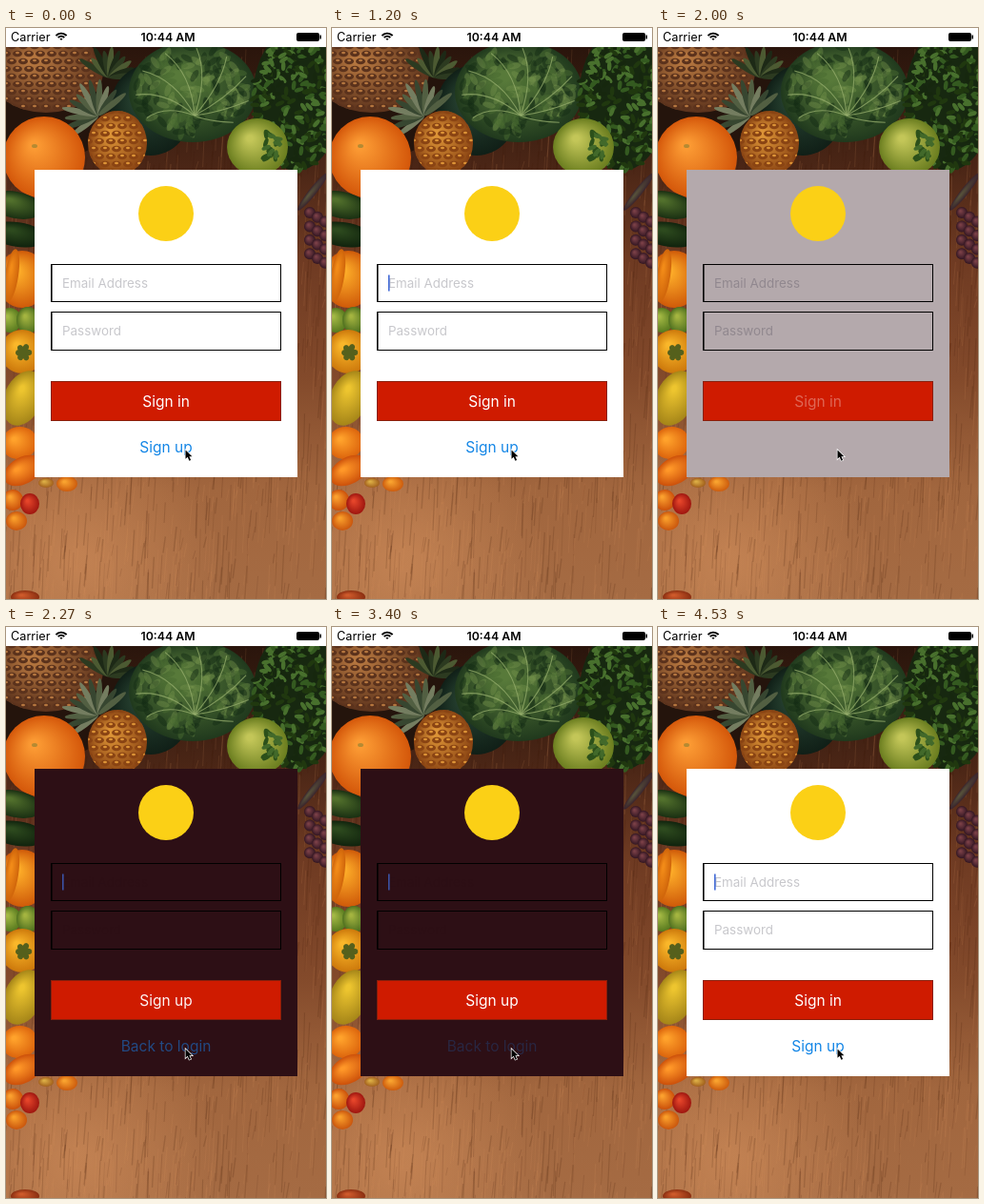
Recreate the animation shown at these times as an HTML page with a canvas. Size 336 by 600 pixels, loop 4590 ms.

```html
<!DOCTYPE html>
<html lang="en">
<head>
<meta charset="utf-8">
<title>Sign in form</title>
<style>
html, body { margin: 0; width: 100%; height: 100%; overflow: hidden; }
canvas { display: block; }
</style>
</head>
<body>
<canvas id="stage" width="336" height="600"></canvas>
<script>
const LOOP = 4590;
const stage = document.getElementById('stage');
const ctx = stage.getContext('2d');
const backdrop = paintBackdrop();

function randomizer(seed) {
  return () => (seed = seed * 16807 % 2147483647) / 2147483647;
}

function ramp(t, from, to) {
  const x = Math.min(1, Math.max(0, (t - from) / (to - from)));
  return x * x * (3 - 2 * x);
}

// Wooden table with simplified fruit and vegetables
function paintBackdrop() {
  const layer = document.createElement('canvas');
  layer.width = 336;
  layer.height = 600;
  const c = layer.getContext('2d');
  const rnd = randomizer(77);

  const blob = (x, y, rx, ry, light, dark = light, turn = 0) => {
    c.save();
    c.translate(x, y);
    c.rotate(turn);
    c.scale(rx, ry);
    const shade = c.createRadialGradient(-.25, -.3, .1, 0, 0, 1);
    shade.addColorStop(0, light);
    shade.addColorStop(1, dark);
    c.fillStyle = shade;
    c.beginPath();
    c.arc(0, 0, 1, 0, 7);
    c.fill();
    c.restore();
  };
  const leaves = (x, y, rx, ry, count, size, colors) => {
    for (let i = 0; i < count; i++) {
      const a = rnd() * 6.28, r = Math.sqrt(rnd());
      blob(x + rx * r * Math.cos(a), y + ry * r * Math.sin(a), size, size * .45,
        colors[i % colors.length], undefined, rnd() * 3.14);
    }
  };
  const spikes = (x, y, from, to, count, length, colors) => {
    for (let i = 0; i < count; i++) {
      const a = from + (to - from) * i / (count - 1), r = length * (.75 + rnd() * .3) / 2;
      blob(x + r * Math.cos(a), y + r * Math.sin(a), r, 3.2, colors[i % colors.length], undefined, a);
    }
  };
  const pineapple = (x, y, rx, ry, light, dark) => {
    blob(x, y, rx, ry, light, dark);
    c.save();
    c.beginPath();
    c.ellipse(x, y, rx, ry, 0, 0, 7);
    c.clip();
    for (let row = 0, py = y - ry; py < y + ry; py += 8, row++)
      for (let px = x - rx + row % 2 * 6; px < x + rx; px += 12) {
        blob(px, py, 5, 3.2, dark);
        blob(px, py - 1, 2, 1.3, light);
      }
    c.restore();
  };
  const wash = (gradient, ...stops) => {
    stops.forEach(([at, color]) => gradient.addColorStop(at, color));
    c.fillStyle = gradient;
    c.fillRect(0, 0, 336, 600);
  };

  wash(c.createLinearGradient(0, 20, 0, 600),
    [0, '#2a150c'], [.22, '#4b2616'], [.38, '#6e3a22'], [.6, '#834a2b'], [.8, '#a1663e'], [1, '#a56b43']);
  wash(c.createRadialGradient(75, 560, 10, 75, 560, 150),
    [0, 'rgba(222,152,98,.5)'], [1, 'rgba(222,152,98,0)']);
  for (let i = 0; i < 1300; i++) {
    const x = rnd() * 345, y = 20 + rnd() * 580, h = 8 + rnd() * 45;
    c.strokeStyle = i % 2 ? 'rgba(60,22,8,.17)' : 'rgba(225,155,100,.13)';
    c.lineWidth = .5 + rnd();
    c.beginPath();
    c.moveTo(x, y);
    c.lineTo(x - 3 + rnd() * 2, y + h);
    c.stroke();
  }

  // Top row
  blob(35, 75, 90, 65, '#24140c');
  pineapple(42, 46, 60, 43, '#b5763f', '#5b321c');
  spikes(108, 52, 3.7, 6.2, 10, 36, ['#2c3a20', '#4c5a32', '#1d2916']);
  blob(152, 86, 43, 48, '#294533', '#101f17');
  pineapple(117, 121, 31, 34, '#dc9336', '#8a4413');
  spikes(97, 92, 2.5, 5.6, 12, 40, ['#747d60', '#374630', '#525f42']);
  blob(196, 67, 67, 53, '#587a3a', '#20391d');
  leaves(196, 66, 60, 46, 150, 7, ['rgba(118,148,76,.4)', 'rgba(20,44,20,.5)', 'rgba(72,106,48,.5)']);
  c.strokeStyle = 'rgba(150,174,108,.75)';
  c.lineWidth = 1.1;
  for (let i = 0; i < 9; i++) {
    const a = 2.5 + i * .57;
    c.beginPath();
    c.moveTo(198, 92);
    c.quadraticCurveTo(198 + 32 * Math.cos(a + .4), 74 + 26 * Math.sin(a + .4),
      196 + 60 * Math.cos(a), 67 + 46 * Math.sin(a));
    c.stroke();
  }
  blob(305, 75, 46, 75, '#172810');
  leaves(303, 80, 44, 72, 260, 5, ['#20380f', '#345a20', '#16270e', '#48702d']);
  blob(264, 125, 32, 30, '#c3c658', '#6a7d1f');
  leaves(278, 123, 11, 16, 20, 5, ['#2c501a', '#42692a']);
  blob(40, 136, 43, 43, '#fb9a33', '#d4570a');
  blob(30, 124, 3, 2, '#b58a32');

  // Right edge
  blob(322, 172, 25, 4, '#56513a', '#39232c', -.9);
  for (let i = 0; i < 12; i++)
    blob(319 + i % 3 * 8, 194 + i * 4.8, 6, 6, '#7b4047', '#321622');

  // Left edge
  blob(10, 186, 29, 14, '#52702c', '#192f12', .2);
  blob(12, 217, 30, 13, '#2d4a1e', '#10220d', .15);
  blob(17, 264, 27, 30, '#ffb02a', '#cf5a09');
  blob(6, 260, 7, 28, '#f28b18', '#cf640a', .15);
  blob(4, 307, 12, 13, '#a4b944', '#57791e');
  blob(23, 307, 12, 14, '#a4b440', '#4f701f');
  blob(17, 340, 23, 23, '#fab72a', '#cc780b');
  spikes(18, 341, 0, 5.2, 6, 10, ['#55601c']);
  blob(18, 389, 20, 30, '#edc52f', '#a58518', .4);
  blob(14, 436, 19, 17, '#ffa22b', '#dc640c', -.2);
  blob(18, 465, 22, 14, '#ff9728', '#cc500a', -.5);
  blob(42, 478, 8, 5, '#dcae45', '#a2601c');
  blob(64, 479, 11, 8, '#f9a32f', '#cd5c0d');
  blob(7, 496, 11, 11, '#fba02e', '#cb500a');
  blob(25, 500, 10, 11, '#e6452a', '#9e160f');
  blob(11, 518, 11, 10, '#f99e2a', '#ca560d');
  blob(20, 598, 15, 7, '#ce5a2b', '#8a2e10');
  return layer;
}

function label(text, x, y, size, color, { alpha = 1, align = 'center', weight = 400 } = {}) {
  ctx.globalAlpha = alpha;
  ctx.font = `${weight} ${size}px Inter, sans-serif`;
  ctx.textAlign = align;
  ctx.fillStyle = color;
  ctx.fillText(text, x, y);
  ctx.globalAlpha = 1;
}

function drawStatusBar() {
  ctx.fillStyle = '#fff';
  ctx.fillRect(0, 0, 336, 20);
  label('Carrier', 5, 14, 12.7, '#000', { align: 'left' });
  label('10:44 AM', 170, 14, 12.3, '#000', { weight: 600 });
  ctx.strokeStyle = '#000';
  ctx.lineWidth = 1.9;
  for (const r of [1.2, 4.3, 7.4]) {
    ctx.beginPath();
    ctx.arc(58, 13, r, -Math.PI * .77, -Math.PI * .23);
    ctx.stroke();
  }
  ctx.beginPath();
  ctx.roundRect(305, 5, 24, 9, 2);
  ctx.fill();
  ctx.fillRect(329.5, 7.5, 1.5, 4);
}

function drawField(text, y, height, alpha) {
  ctx.strokeStyle = ctx.fillStyle = '#000';
  ctx.lineWidth = 1;
  ctx.strokeRect(47.5, y + .5, 241, height - 1);
  ctx.fillRect(48, y, .6, height);
  label(text, 59, y + 25, 13.4, 'rgba(0,0,25,.22)', { align: 'left', alpha });
}

function drawPointer() {
  const arrow = new Path2D('M188.5 443.5v9.3l2.2-2 1.7 3.9 1.7-.7-1.7-3.8h3z');
  ctx.strokeStyle = '#fff';
  ctx.lineWidth = 1.4;
  ctx.stroke(arrow);
  ctx.fillStyle = '#000';
  ctx.fill(arrow);
}

function draw(t) {
  const dark = ramp(t, 1880, 2180) - ramp(t, 3430, 3650);
  const mix = (a, b) => Math.round(a + (b - a) * dark);

  ctx.drawImage(backdrop, 0, 0);
  drawStatusBar();
  ctx.fillStyle = `rgb(${mix(255, 45)},${mix(255, 15)},${mix(255, 21)})`;
  ctx.fillRect(30, 149, 276, 323);

  ctx.fillStyle = '#fbd016';
  ctx.beginPath();
  ctx.arc(168, 195, 29, 0, 7);
  ctx.fill();

  const hint = 1 - dark * dark * .9;
  drawField('Email Address', 248, 40, hint);
  drawField('Password', 298, 41, hint);

  const blink = t % 1000;
  ctx.globalAlpha = (ramp(blink, 50, 200) - ramp(blink, 520, 720)) * (1 - dark * .25);
  ctx.fillStyle = '#4169d6';
  ctx.fillRect(59, 259.5, 1.6, 17);
  ctx.globalAlpha = 1;

  ctx.fillStyle = '#cf1b00';
  ctx.fillRect(47, 371, 242, 42);
  ctx.strokeStyle = 'rgba(80,35,20,.55)';
  ctx.lineWidth = 1;
  ctx.strokeRect(47.5, 371.5, 241, 41);

  const signIn = 1 - ramp(t, 1860, 2090) + ramp(t, 3560, 3840);
  const signUp = ramp(t, 2090, 2300) - ramp(t, 3420, 3530);
  label('Sign in', 168, 397.5, 15.5, '#fff', { alpha: signIn });
  label('Sign up', 168, 397.5, 15.5, '#fff', { alpha: signUp });

  const upLink = 1 - ramp(t, 1740, 1950) + ramp(t, 3560, 3790);
  const backLink = ramp(t, 2100, 2400) - ramp(t, 3300, 3450);
  label('Sign up', 168, 445.5, 15.5, '#1486e6', { alpha: upLink });
  label('Back to login', 168, 445.5, 15.5, '#1a7be0', { alpha: backLink * .9 });
  drawPointer();
}

function tick() {
  draw(performance.now() % LOOP);
  requestAnimationFrame(tick);
}
tick();
</script>
</body>
</html>
```
